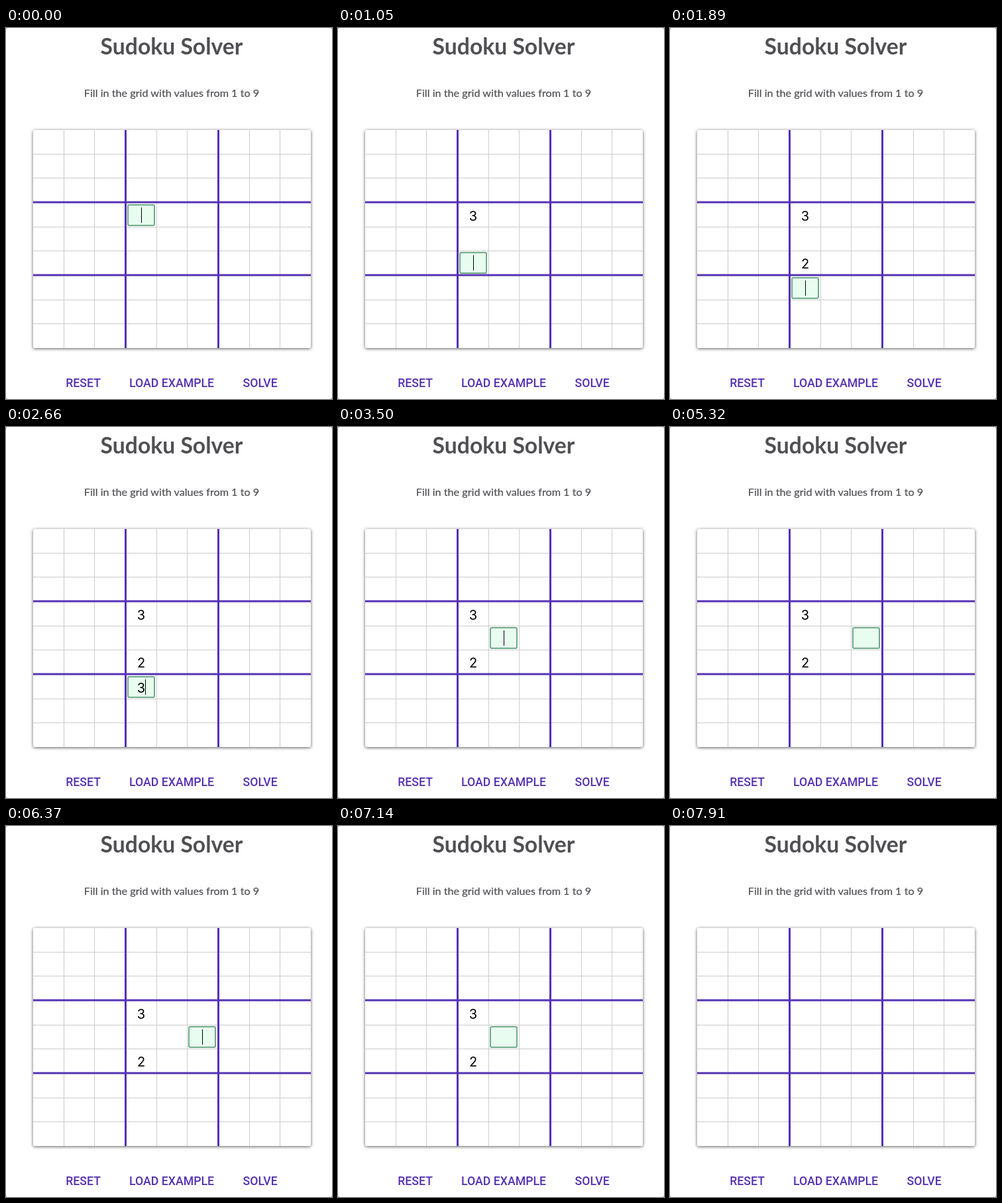
Write an HTML page that moves like this. It is 492x560 px and loops after 8000 ms.

```html
<!DOCTYPE html>
<html lang="en">
<head>
<meta charset="utf-8">
<title>Sudoku Solver</title>
<style>
  html, body { margin: 0; width: 100%; height: 100%; overflow: hidden; background: #a9a9a9; }
  svg { display: block; width: 492px; height: 560px; }
  text { text-anchor: middle; }
  .title { font: 700 33.7px Lato, "Open Sans", sans-serif; fill: #4f4f54; }
  .hint { font: 400 16.2px Lato, "Open Sans", sans-serif; fill: #4f4f54; stroke: #4f4f54; stroke-width: .2; }
  .button { font: 500 17.7px Roboto, Inter, sans-serif; fill: #5632b0; }
  .digit { font: 400 20px Inter, "Liberation Sans", sans-serif; fill: #000; }
  .board { fill: #fff; filter: drop-shadow(0 1px 2.5px rgba(0, 0, 0, .65)); }
  .thin { stroke: #ccc; stroke-width: 1; }
  .thick { stroke: #5632b4; stroke-width: 3; }
  .focus { fill: #e8fdf0; stroke: #70ab88; stroke-width: 2; }
  .press { fill: #f0eef5; filter: drop-shadow(0 2px 6px rgba(0, 0, 0, .16)); }
</style>
</head>
<body>
<svg viewBox="0 0 492 560">
  <rect width="492" height="560" rx="3" fill="#fff"/>
  <text class="title" x="250" y="39.5">Sudoku Solver</text>
  <text class="hint" x="250" y="104">Fill in the grid with values from 1 to 9</text>
  <rect class="board" x="41" y="154" width="419" height="329" rx="2"/>
  <g id="lines"></g>
  <rect id="press" class="press" x="73" y="518" width="88" height="36" rx="2"/>
  <text class="button" x="116.6" y="542">RESET</text>
  <text class="button" x="250" y="542">LOAD EXAMPLE</text>
  <text class="button" x="383.7" y="542">SOLVE</text>
  <rect id="focus" class="focus" width="40" height="31" rx="2"/>
  <g id="digits"></g>
  <rect id="caret" width="1" height="23"/>
</svg>
<script>
const LOOP = 8000, BLINK = 490;
const PRESS = 7210, RESET = 7630;
const $ = id => document.getElementById(id);

// Top left corner of a cell's input
const cellX = col => 43 + 46 * col + 2 * Math.floor(col / 3);
const cellY = row => 156 + 36 * row + 2 * Math.floor(row / 3);

// [time, row, column, new value]; without a value the focus only moves
const steps = [
  [-420, 3, 3], [420, 3, 3, "3"],
  [770, 4, 3], [910, 5, 3], [1190, 5, 3, "2"],
  [1680, 6, 3], [2310, 6, 3, "3"], [2940, 6, 3, ""],
  [3080, 5, 3], [3220, 4, 3], [3290, 4, 4],
  [3850, 4, 4, "3"], [4550, 4, 4, ""],
  [4760, 4, 5], [5600, 4, 5, "2"], [6300, 4, 5, ""],
  [6650, 4, 4]
];

function add(parent, tag, attrs) {
  const el = document.createElementNS("http://www.w3.org/2000/svg", tag);
  for (const name in attrs) el.setAttribute(name, attrs[name]);
  return parent.appendChild(el);
}

function place(el, x, y) {
  el.setAttribute("x", x);
  el.setAttribute("y", y);
}

function show(el, on) {
  el.style.visibility = on ? "visible" : "hidden";
}

function drawLines() {
  for (const thick of [false, true]) {
    const cls = thick ? "thick" : "thin";
    for (let i = 1; i < 9; i++) {
      if ((i % 3 === 0) !== thick) continue;
      const x = cellX(i) - (thick ? 2.5 : 1.5);
      const y = cellY(i) - (thick ? 3 : 1.5);
      add($("lines"), "path", { class: cls, d: `M${x} 154V483` });
      add($("lines"), "path", { class: cls, d: `M41 ${y}H460` });
    }
  }
}

const labels = {};
function makeLabels() {
  for (const [, row, col, value] of steps) {
    const key = row + "," + col;
    if (value && !labels[key]) {
      labels[key] = add($("digits"), "text", {
        class: "digit", x: cellX(col) + 21, y: cellY(row) + 24.5
      });
    }
  }
}

function draw(t) {
  const board = {};
  let last;
  for (const step of steps) {
    if (step[0] > t) break;
    last = step;
    if (step[3] !== undefined) board[step[1] + "," + step[2]] = step[3];
  }
  for (const key in labels) {
    labels[key].textContent = t < RESET ? board[key] || "" : "";
  }

  const [since, row, col] = last;
  const x = cellX(col), y = cellY(row);
  const active = t < PRESS;
  const filled = board[row + "," + col];
  place($("focus"), x + 1, y + 1);
  place($("caret"), x + (filled ? 27 : 21), y + 5);
  show($("focus"), active);
  show($("caret"), active && Math.floor((t - since) / BLINK) % 2 === 0);
  show($("press"), t >= PRESS && t < RESET);
}

drawLines();
makeLabels();
const start = performance.now();
function tick() {
  draw((performance.now() - start) % LOOP);
  requestAnimationFrame(tick);
}
tick();
</script>
</body>
</html>
```
